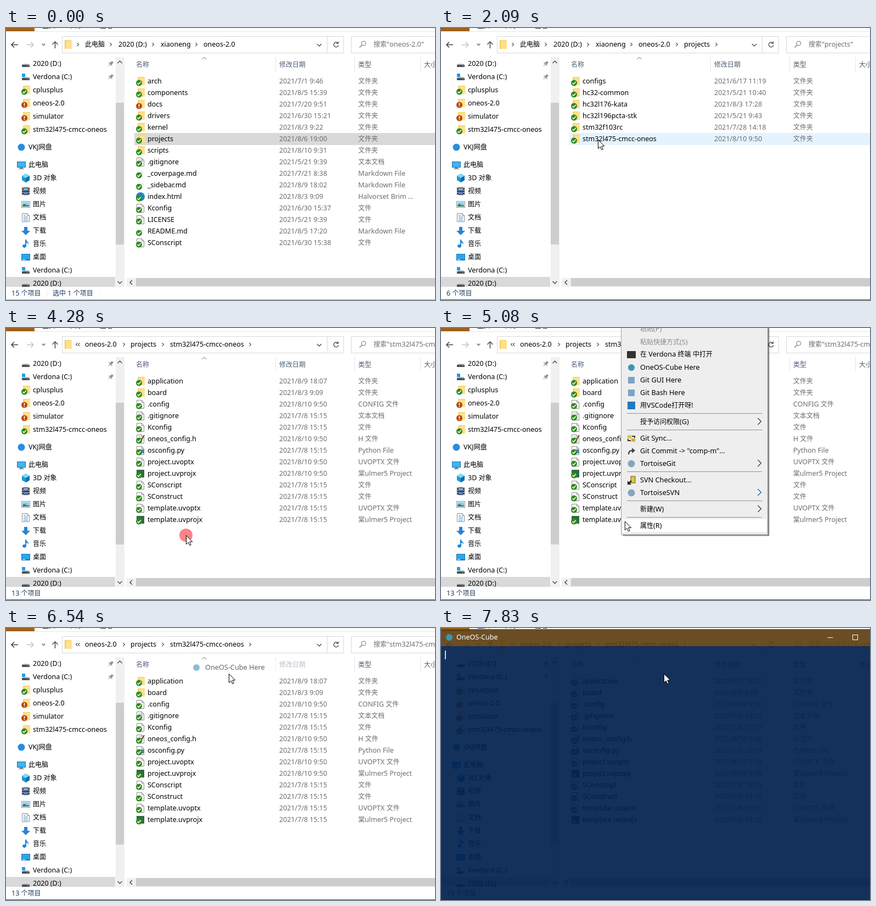
An HTML page for the animation above (8000 ms loop, 782 by 495 pixels).

```html
<!DOCTYPE html>
<html lang="zh-CN">
<head>
<meta charset="utf-8">
<title>Explorer to console</title>
<style>
html, body { margin: 0; width: 100%; height: 100%; overflow: hidden; background: #fff; }
svg { display: block; width: 782px; height: 495px; }
text { font: 12.5px "Noto Sans", "Noto Sans CJK SC", "Noto Sans CJK", sans-serif; white-space: pre; }
#menu text, #picked text { font-size: 12.7px; }
.cjk { font-size: 12px; }
.mono { font: 13.33px "Liberation Mono", monospace; }
</style>
</head>
<body>
<svg id="stage" viewBox="0 0 782 495"></svg>
<script>
const LOOP = 8000;
const stage = document.getElementById('stage');

// ---- drawing helpers ----
const rect = (x, y, w, h, fill, more = '') =>
  `<rect x="${x}" y="${y}" width="${w}" height="${h}" fill="${fill}" ${more}/>`;
const dot = (x, y, r, fill, more = '') => `<circle cx="${x}" cy="${y}" r="${r}" fill="${fill}" ${more}/>`;
const line = (d, color, w = 1, more = '') => `<path d="${d}" fill="none" stroke="${color}" stroke-width="${w}" ${more}/>`;
const fillPath = (d, color) => `<path d="${d}" fill="${color}"/>`;
const esc = s => s.replace(/&/g, '&amp;').replace(/</g, '&lt;').replace(/>/g, '&gt;');
const text = (x, cy, s, fill = '#000') =>
  `<text x="${x}" y="${cy + 4.3}" fill="${fill}">` +
  esc(s).replace(/[\u2e80-\u9fff]+/g, m => `<tspan class="cjk">${m}</tspan>`) + '</text>';
const group = (id, body) => `<g id="${id}">${body}</g>`;
// A negative size points the chevron left.
const right = (x, y, s = 3, color = '#555', w = 1.2) =>
  line(`M${x - s / 2} ${y - s}l${s} ${s}l${-s} ${s}`, color, w);
const down = (x, y, s, color, w = 1.5) => line(`M${x - s} ${y - s / 2}l${s} ${s}l${s} ${-s}`, color, w);
const up = (x, y, s, color, w = 1.5) => line(`M${x - s} ${y + s / 2}l${s} ${-s}l${s} ${s}`, color, w);

// ---- icons, centred on 0,0 in a 16px box ----
const folder = rect(-5, -8, 13, 15, '#f3c95c') + rect(-3, -7, 11, 14, '#ffe08a') + rect(-5, -8, 3, 15, '#ffd566');
const page = '<path d="M-6.5 -7.5h9l4 4v11h-13z" fill="#fff" stroke="#8c8c8c"/>' + line('M2.5 -7.5v4h4', '#8c8c8c');
const lines = line('M-3 -4h4M-3 -1.5h7M-3 1h7M-3 3.5h7', '#8a9aa8');
const ok = dot(-2.5, 3, 5.5, '#2f8a1c') + line('M-5.5 3l2.2 2.4l4 -4.6', '#fff', 1.6);
const changed = dot(-2.5, 3, 5.5, '#b4480f') + line('M-2.5 -.5v4.2M-2.5 5v1.6', '#fff', 1.8);
const drive = fillPath('M-5 0h10l2 3h-14z', '#b9bcc0') + rect(-7, 2, 14, 4, '#4b4f55') + rect(3, 3, 2, 1, '#8fe08f');
const screen = rect(-8, -6, 16, 11, '#1f6fb5') + rect(-7, -5, 14, 9, '#41b4ee');
const icons = {
  ok: folder + ok,
  mod: folder + changed,
  page: page + ok,
  txt: page + lines + ok,
  md: line('M0 -4h5M1 -1.5h5', '#d5d9dd') + ok,
  web: dot(0, 0, 8, '#1f86c9') + ok,
  note: page + lines + line('M7 -7L0 5', '#8a3b22', 2) + ok,
  py: page + rect(0, -2, 7, 7, '#4a86b8') + ok,
  proj: rect(-7, -7, 14, 14, '#2f6b3f') + ok,
  drive,
  sys: drive + rect(-7, -6, 6, 6, '#1e9be8'),
  cloud: dot(0, 0, 6.5, '#2a8de0'),
  pc: screen + rect(-3, 5, 6, 2, '#7d8a96') + rect(-5, 7, 10, 1, '#7d8a96'),
  cube: fillPath('M0 -8L7 -4V4L0 8L-7 4V-4z', '#1d9ad6') + fillPath('M0 -8L7 -4L0 0L-7 -4z', '#7fdcf5') + fillPath('M0 0L7 -4V4L0 8z', '#0e6fb0'),
  film: rect(-7, -7, 14, 14, '#333') + rect(-4, -6, 8, 5, '#7aa7d8') + rect(-4, 1, 8, 5, '#5b7fc0') +
    line('M-5.5 -7V7M5.5 -7V7', '#ddd', 1.5, 'stroke-dasharray="2 2"'),
  pic: rect(-7.5, -5.5, 15, 11, '#fff', 'stroke="#8a8f94"') + rect(-6, -4, 12, 8, '#8ccdf0') + fillPath('M-6 4V1l4 -2l4 3l4 -1v3z', '#3a7d6b'),
  doc: page + line('M-4 -4h4M-4 -1h8M-4 2h8M-4 5h8', '#3c86c6'),
  down: fillPath('M-3 -7h6V0h5L0 8L-8 0h5z', '#2b82d4'),
  music: fillPath('M-1 -8h2c0 4 5 4 4 9c-1 -3 -3 -3 -4 -3v6a3.5 3 0 1 1 -2 -3z', '#1e88d8'),
  desk: rect(-8, -6, 16, 12, '#1b76bd') + rect(-7, -5, 14, 9, '#2ba5ea') + rect(-6, 4, 5, 1, '#fff'),
  term: rect(-8, -6, 16, 13, '#333'),
  ring: dot(0, 0, 6, '#3f93b5'),
  git: rect(-6, -6, 12, 12, '#7ba4c9'),
  code: rect(-7, -7, 14, 14, '#2478bd'),
  turtle: dot(0, 0, 6.5, '#86a5bd'),
  sync: rect(-7, -6, 7, 6, '#e0c341') + rect(0, 0, 7, 6, '#d1b334') + line('M1 -4h5v3M-1 4h-5v-3', '#333', 2),
  commit: line('M-5 6c0 -6 3 -7 7 -7', '#444', 2.5) + fillPath('M1 -6l6 5l-6 5z', '#444'),
  check: rect(-1, -7, 8, 12, '#e3c53c', 'stroke="#665a20"') + line('M-6 7L0 1', '#222', 2.5) + fillPath('M-7 1v7h7z', '#222')
};
const icon = (kind, x, y) => `<g transform="translate(${x} ${y})">${icons[kind]}</g>`;

// ---- content ----
const types = { F: '文件夹', f: '文件', T: '文本文档', M: 'Markdown File', E: 'Halvorset Brim ...',
  C: 'CONFIG 文件', H: 'H 文件', P: 'Python File', U: 'UVOPTX 文件', V: '棠ulmer5 Project' };
const dirs = [
  `ok|arch|7/1 9:46|F
ok|components|8/5 15:39|F
mod|docs|7/20 9:51|F
ok|drivers|6/30 15:21|F
ok|kernel|8/3 9:22|F
ok|projects|8/6 19:00|F
ok|scripts|8/10 9:31|F
txt|.gitignore|5/21 9:39|T
md|_coverpage.md|7/21 8:38|M
md|_sidebar.md|8/9 18:02|M
web|index.html|8/3 9:09|E
page|Kconfig|6/30 15:37|f
page|LICENSE|5/21 9:39|f
md|README.md|8/5 17:20|M
page|SConscript|6/30 15:38|f`,
  `ok|configs|6/17 11:19|F
ok|hc32-common|5/21 10:40|F
ok|hc32l176-kata|8/3 17:28|F
ok|hc32l196pcta-stk|5/21 9:43|F
ok|stm32f103rc|7/28 14:18|F
ok|stm32l475-cmcc-oneos|8/10 9:50|F`,
  `ok|application|8/9 18:07|F
ok|board|8/3 9:09|F
page|.config|8/10 9:50|C
txt|.gitignore|7/8 15:15|T
page|Kconfig|7/8 15:15|f
note|oneos_config.h|8/10 9:50|H
py|osconfig.py|7/8 15:15|P
page|project.uvoptx|8/10 9:50|U
proj|project.uvprojx|8/10 9:50|V
page|SConscript|7/8 15:15|f
page|SConstruct|7/8 15:15|f
page|template.uvoptx|7/8 15:15|U
proj|template.uvprojx|7/8 15:15|V`
].map(s => s.split('\n').map(r => r.split('|')));
const titles = ['oneos-2.0', 'projects', 'stm32l475-cmcc-oneos'];

const listing = (rows, n) => group('dir' + n, rows.map(([kind, name, date, type], i) => {
  const y = 97 + 21 * i;
  return icon(kind, 245, y) + text(258, y, name) + text(498, y, '2021/' + date, '#6d6d6d') +
    text(642, y, types[type], '#6d6d6d');
}).join('') + text(670, 30, `搜索"${titles[n]}"`, '#6d6d6d') + text(10, 483, rows.length + ' 个项目', '#1e395b'));

const address = (n, crumbs, chevrons, folded) => group('addr' + n,
  crumbs.map(([x, s]) => text(x, 30, s)).join('') + chevrons.map(x => right(x, 30)).join('') +
  (folded ? right(129, 30, -2.8) + right(133, 30, -2.8) : right(131, 30)));
const root = [[144, '此电脑'], [205, '2020 (D:)'], [282, 'xiaoneng'], [360, titles[0]]];
const addresses = [
  address(0, root, [191, 268, 347]),
  address(1, [...root, [443, titles[1]]], [191, 268, 347, 430]),
  address(2, [...root, [443, titles[1]]], [191, 268, 347, 430, 502]),
  address(3, [[144, 'xiaoneng'], [222, titles[0]], [305, titles[1]], [377, titles[2]]], [210, 293, 365], true),
  address(4, [[144, titles[0]], [227, titles[1]], [299, titles[2]]], [215, 286, 445], true)
];

const places = [['drive', '2020 (D:)', 65], ['sys', 'Verdona (C:)', 89], ['ok', 'cplusplus', 113],
  ['mod', 'oneos-2.0', 137], ['mod', 'simulator', 161], ['ok', 'stm32l475-cmcc-oneos', 185],
  ['cloud', 'VKJ网盘', 217, -8], ['pc', '此电脑', 249, -8], ['cube', '3D 对象', 273], ['film', '视频', 297],
  ['pic', '图片', 321], ['doc', '文档', 345], ['down', '下载', 369], ['music', '音乐', 393],
  ['desk', '桌面', 417], ['sys', 'Verdona (C:)', 441], ['drive', '2020 (D:)', 465]];
const pin = y => `<g transform="translate(191 ${y}) rotate(45)">` +
  rect(-2, -5, 4, 5, '#8a9096') + rect(-4, 0, 8, 1.5, '#8a9096') + rect(-.5, 1, 1, 5, '#8a9096') + '</g>';
const sidebar = rect(0, 453, 199, 18, '#d9d9d9') +
  places.map(([kind, s, y, dx = 0]) => icon(kind, 36 + dx, y) + text(49 + dx, y, s)).join('') +
  pin(65) + pin(89) + rect(200, 53, 16, 418, '#f0f0f0') + rect(200, 136, 15, 258, '#cdcdcd') +
  up(207.5, 62, 4, '#505050') + down(207.5, 463, 4, '#505050') + rect(0, 471, 782, 24, '#fff');

const toolbar = text(66, -4, '主页') + text(117, -4, '共享') + text(171, -4, '查看') +
  rect(52, 6, 730, 1, '#e6e6e6') + rect(0, 0, 52, 6, '#a0621a') +
  line('M22 30.5H10M15 25.5l-5 5l5 5', '#444', 1.6) + line('M38 30.5h12M45 25.5l5 5l-5 5', '#c4c4c4', 1.5) +
  down(68.5, 30, 2.8, '#777') + line('M89.5 37V25M84.5 30l5 -5l5 5', '#5a5a5a', 1.7) +
  rect(102.5, 15.5, 513, 30, 'none', 'stroke="#d9d9d9"') + line('M585.5 16v29', '#d9d9d9') +
  rect(629.5, 15.5, 170, 30, 'none', 'stroke="#d9d9d9"') +
  rect(107, 22, 12, 16, '#f3c95c') + rect(109, 23, 11, 15, '#ffe08a') +
  down(571, 31, 4, '#555') + line('M605 27.5a4.3 4.3 0 1 0 1 3.5M605.5 24.5v3.5h-3.5', '#555', 1.4) +
  dot(652, 28, 4, 'none', 'stroke="#777"') + line('M649 31l-4.5 4.5', '#777', 1.3);

const header = [[237, '名称'], [498, '修改日期'], [642, '类型'], [762, '大小']]
  .map(([x, s]) => text(x, 67, s, '#4c5d75')).join('') +
  line('M491.5 53v27M635.5 53v27M755.5 53v27', '#e5e5e5') + up(361.5, 55, 4, '#666', 1);
const bottomBar = rect(220, 455, 562, 16, '#f0f0f0') + rect(237, 455, 545, 15, '#cdcdcd') +
  line('M230 459l-4 4l4 4', '#505050', 1.6);

// ---- context menu ----
const entries = [[2, '粘贴(P)'], [26, '粘贴快捷方式(S)'], [48, '在 Verdona 终端 中打开', 'term'], [72, 'OneOS-Cube Here', 'ring'],
  [95, 'Git GUI Here', 'git'], [118, 'Git Bash Here', 'git'], [141, '用VSCode打开呀!', 'code'],
  [171, '授予访问权限(G)', '', '#333'], [201, 'Git Sync...', 'sync'], [224, 'Git Commit -> "comp-m"...', 'commit'],
  [247, 'TortoiseGit', 'turtle', '#333'], [277, 'SVN Checkout...', 'check'], [300, 'TortoiseSVN', 'turtle', '#0066b4'],
  [330, '新建(W)', '', '#333'], [360, '属性(R)']];
const entry = ([y, s, kind, arrow]) => (kind ? icon(kind, 347, y) : '') +
  text(363, y, s, y < 30 ? '#8a8a8a' : '#000') + (arrow ? right(580.5, y - 1, 6, arrow, 1.2) : '');
const menu = group('menu', rect(332, 0, 267, 379, '#000', 'opacity=".2"') + rect(331, 0, 267, 378, '#000', 'opacity=".35"') +
  rect(328.5, -5, 267, 381, '#eee', 'stroke="#a0a0a0"') + rect(331, 60, 262, 23, '#fff', 'id="hot"') +
  [155.5, 185.5, 261.5, 314.5, 344.5].map(y => line(`M339 ${y}H585`, '#919191')).join('') + entries.map(entry).join(''));
const picked = group('picked', rect(331, 60, 262, 23, '#fff') + entry(entries[3]));

// ---- console window ----
const consoleWindow = group('term', group('termTitle', rect(-1, 2, 808, 31, '#603f12', 'opacity=".92"')) +
  group('termBody', rect(-1, 33, 808, 500, '#00204f', 'opacity=".92"')) +
  group('termInk', icon('ring', 15, 17) + text(28, 17, 'OneOS-Cube', '#fff') +
    line('M704.5 17.5h10', '#fff') + rect(750.5, 12.5, 9, 9, 'none', 'stroke="#fff"') +
    '<text id="log" class="mono" x="6" y="54" fill="#fff">Console server started PID=13840...</text>' +
    rect(7, 41, 2, 16, '#c9e29a', 'id="caret"')));

const pointer = group('pointer', dot(0, 0, 12, '#fc8484', 'id="click"') +
  '<path d="M.5 .5V16.5L4.2 13L6.7 18.6L9.2 17.5L6.8 12H11.8Z" fill="#fff" stroke="#000"/>' +
  dot(13, 0, 6, 'none', 'id="busy" stroke="#5fb4ec" stroke-width="3" stroke-dasharray="30 8"'));

stage.innerHTML = rect(0, 0, 782, 495, '#fff') + sidebar + toolbar + header + rect(234, 191, 548, 22, '', 'id="sel"') +
  rect(234, 191, 548, 22, '#e5f3ff', 'id="hover"') + dirs.map(listing).join('') + addresses.join('') + bottomBar +
  group('picked0', text(85, 483, '选中 1 个项目', '#1e395b') + line('M74.5 476v14M170.5 476v14', '#f0f0f0')) +
  group('picked1', text(78, 483, '选中 1 个项目', '#1e395b')) + rect(0, 494, 782, 1, '', 'id="edge"') +
  menu + consoleWindow + picked + pointer;

// ---- timeline ----
const el = {};
stage.querySelectorAll('[id]').forEach(e => el[e.id] = e);
const show = (id, on) => el[id].style.display = on ? '' : 'none';
const within = (t, a, b) => t >= a && t < b;
const stepped = (t, a, b, n) => t < a ? 0 : Math.min(1, (Math.floor((t - a) / ((b - a) / (n - 1)) + .01) + 1) / n);
const ease = p => p * p * (3 - 2 * p);

// start, end, steps, destination x, y
const moves = [[420, 930, 9, 286, 203], [3700, 4210, 8, 328, 377], [5010, 5680, 11, 406, 83]];
const clicks = [[1530, 1750], [2890, 3160], [4280, 4420], [6350, 6480]];
const fade = [0, .2, .45, .72, .9, 1];

function pointerAt(t) {
  let x = 318, y = 470;
  for (const [a, b, n, tx, ty] of moves) {
    const p = ease(stepped(t, a, b, n));
    x += (tx - x) * p;
    y += (ty - y) * p;
  }
  return [x, y];
}

function draw(t) {
  const dir = t < 1750 ? 0 : t < 3230 ? 1 : 2;
  const addr = t < 1750 ? 0 : t < 2090 ? 1 : t < 3230 ? 2 : within(t, 3500, 6550) || t >= 7100 ? 4 : 3;
  dirs.forEach((_, i) => show('dir' + i, i === dir));
  addresses.forEach((_, i) => show('addr' + i, i === addr));

  const [x, y] = pointerAt(t);
  el.pointer.setAttribute('transform', `translate(${x.toFixed(1)} ${y.toFixed(1)})`);
  show('pointer', t >= 420);
  show('click', clicks.some(([a, b]) => within(t, a, b)));
  show('busy', within(t, 6610, 6880));

  const selected = dir === 0 || (dir === 1 && t >= 2890);
  const row = Math.floor((y - 86) / 21);
  const hovering = t >= 420 && t < 4420 && row >= 0 && row < dirs[dir].length;
  show('sel', selected);
  el.sel.setAttribute('fill', hovering && row === 5 ? '#cce8ff' : '#d9d9d9');
  show('hover', hovering && !(selected && row === 5));
  el.hover.setAttribute('y', 86 + 21 * row);
  show('picked0', dir === 0);
  show('picked1', dir === 1 && selected);
  el.edge.setAttribute('fill', t < 1680 ? '#a5a5a5' : '#5a4520');

  show('menu', within(t, 4420, 6430));
  el.menu.style.opacity = stepped(t, 4420, 4690, 4);
  const hot = entries.find(([ey]) => Math.abs(ey - y) <= 12);
  show('hot', t >= 5010 && hot);
  if (hot) el.hot.setAttribute('y', hot[0] - 12);

  const a = t < 6480 ? 0 : fade[Math.min(5, Math.floor((t - 6480) / 66))];
  show('term', a > 0);
  const s = 1 - .057 * (1 - a);
  el.term.setAttribute('transform', `translate(403 267) scale(${s}) translate(-403 -267)`);
  el.termTitle.style.opacity = Math.min(1, a * 1.2);
  el.termBody.style.opacity = a;
  el.termInk.style.opacity = Math.min(1, a * 1.35);
  show('log', within(t, 6670, 6820));
  show('caret', t >= 7830);

  // The chosen entry lingers and fades after the menu closes.
  show('picked', within(t, 6430, 6750));
  el.picked.style.opacity = 1 - stepped(t, 6430, 6750, 5);
}

function tick(now) {
  draw(now % LOOP);
  requestAnimationFrame(tick);
}
draw(0);
requestAnimationFrame(tick);
</script>
</body>
</html>
```
